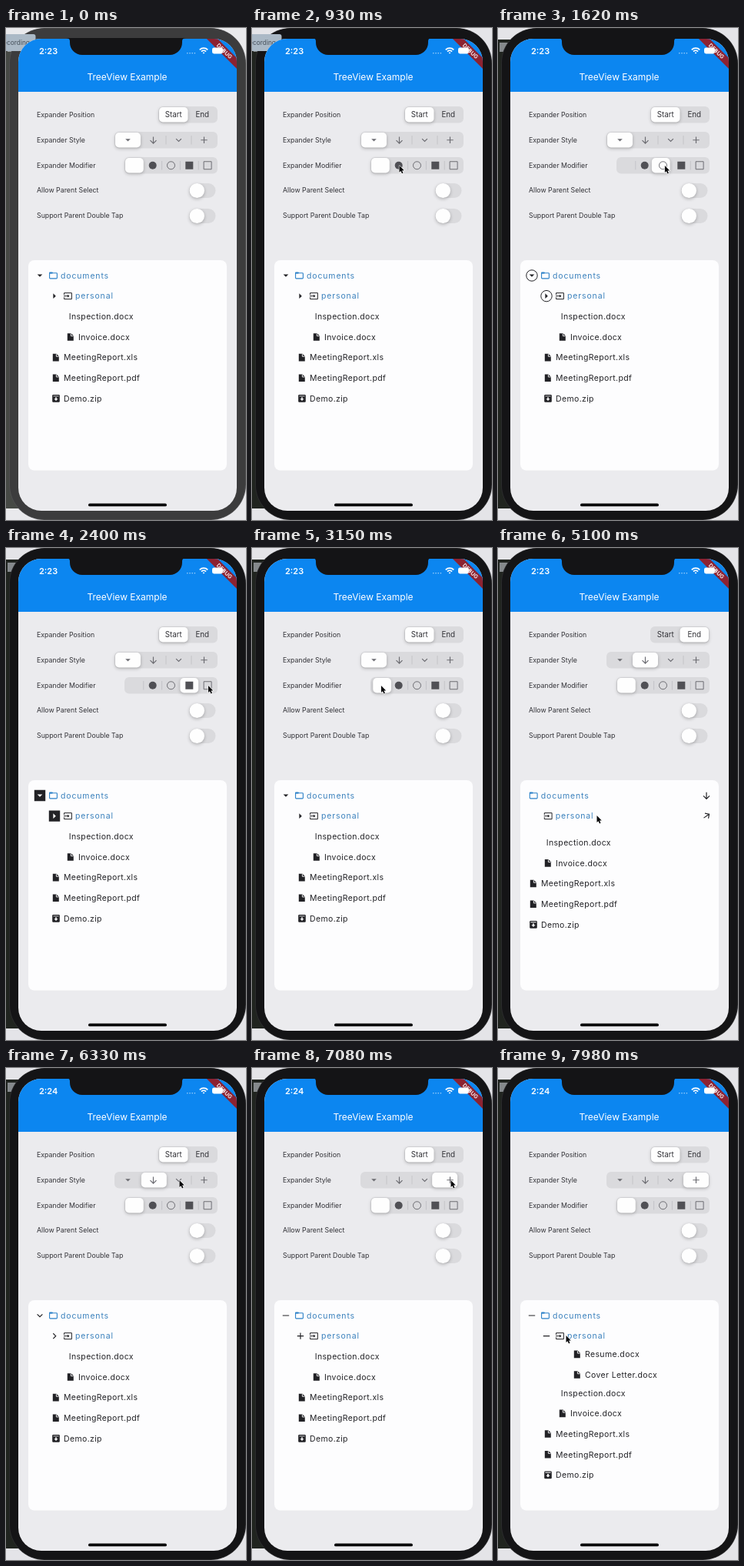
An HTML page with a canvas that plays this animation: 312x640 px, repeating every 8000 ms.

```html
<!DOCTYPE html>
<html lang="en">
<head>
<meta charset="utf-8">
<title>TreeView Example</title>
<style>
html, body { margin: 0; width: 100%; height: 100%; overflow: hidden; background: #ebebee; }
canvas { display: block; width: 312px; height: 640px; }
</style>
</head>
<body>
<canvas id="stage"></canvas>
<script>
const W = 312, H = 640, LOOP = 8000, PI = Math.PI;
const canvas = document.getElementById('stage');
const ctx = canvas.getContext('2d');
const dpr = window.devicePixelRatio || 1;
canvas.width = W * dpr;
canvas.height = H * dpr;

const C = {
  page: '#ebebee', bezel: '#141416', blue: '#0c86f0', card: '#fdfdfe', ink: '#222226',
  label: '#333338', link: '#3c82bd', folder: '#2a80c8', track: '#dadadd', sep: '#c3c3c8',
  glyph: '#6c6c72', ribbon: '#8c2231'
};
const ROW = 26.65, INDENT = 19, FIRST = 322, TRAVEL = 380;

const controls = {
  position: { x: 198, y: 102, w: 77, count: 2 },
  style: { x: 141, y: 135, w: 134, count: 4 },
  modifier: { x: 154, y: 168, w: 121, count: 5 }
};
const cellWidth = c => (c.w - 2) / c.count;
const cellX = (c, i) => c.x + 1 + cellWidth(c) * (i + 0.5);

// Every tap: time, what it sets, new value
const taps = [
  ...[1, 2, 3, 4].map(v => [470 + 493 * v, 'modifier', v]),
  [2900, 'modifier', 0],
  [3680, 'style', 1],
  [4450, 'position', 1],
  [5040, 'open', 1],
  [5480, 'open', 0],
  [5930, 'position', 0],
  [6320, 'style', 2],
  [6950, 'style', 3],
  [7795, 'open', 1]
];

const clamp = v => Math.max(0, Math.min(1, v));
const mix = (a, b, k) => a + (b - a) * k;
const smooth = v => v * v * (3 - 2 * v);
const spring = ms => 1 - (1 + 0.02244 * ms) * Math.exp(-0.02244 * ms);
const linear200 = ms => clamp(ms / 200);

const past = (name, t) => taps.filter(tap => tap[1] === name && tap[0] <= t);
const valueOf = (name, t) => past(name, t).at(-1)?.[2] ?? 0;

function glide(name, t, ease) {
  return past(name, t).reduce((v, [when, , to]) => mix(v, to, ease(t - when)), 0);
}

function box(x, y, w, h, r, fill) {
  ctx.beginPath();
  ctx.roundRect(x, y, w, h, r);
  ctx.fillStyle = fill;
  ctx.fill();
}

function raised(x, y, w, h, r) {
  ctx.save();
  ctx.shadowColor = 'rgba(0,0,0,.25)';
  ctx.shadowBlur = 4 * dpr;
  ctx.shadowOffsetY = 1.5 * dpr;
  box(x, y, w, h, r, '#fefefe');
  ctx.restore();
}

function poly(points, fill) {
  ctx.beginPath();
  points.forEach(([x, y]) => ctx.lineTo(x, y));
  ctx.closePath();
  ctx.fillStyle = fill;
  ctx.fill();
}

function lines(color, width, ...paths) {
  ctx.beginPath();
  for (const p of paths) p.forEach(([x, y], i) => i ? ctx.lineTo(x, y) : ctx.moveTo(x, y));
  ctx.strokeStyle = color;
  ctx.lineWidth = width;
  ctx.stroke();
}

function text(str, x, y, size, color, { weight = 400, align = 'left', spacing = 0 } = {}) {
  ctx.font = `${weight} ${size}px Inter, "Liberation Sans", sans-serif`;
  ctx.letterSpacing = spacing + 'px';
  ctx.textAlign = align;
  ctx.fillStyle = color;
  ctx.fillText(str, x, y);
}

function at(x, y, angle, draw) {
  ctx.save();
  ctx.translate(x, y);
  ctx.rotate(angle);
  draw();
  ctx.restore();
}

// Expander glyphs, pointing down around the origin
const glyphs = [
  c => poly([[-3.3, -1.6], [3.3, -1.6], [0, 1.8]], c),
  c => lines(c, 1.2, [[0, -4.3], [0, 4.2]], [[-4, 0.3], [0, 4.3], [4, 0.3]]),
  c => lines(c, 1.2, [[-3.4, -1.7], [0, 1.7], [3.4, -1.7]]),
  c => lines(c, 1.2, [[-4.2, 0], [4.2, 0]], [[0, -4.2], [0, 4.2]])
];

// 0 none, 1 disc, 2 ring, 3 square, 4 frame
function shape(kind, r, color) {
  if (!kind) return;
  ctx.beginPath();
  if (kind < 3) ctx.arc(0, 0, r, 0, PI * 2);
  else ctx.rect(-r, -r, 2 * r, 2 * r);
  ctx.fillStyle = ctx.strokeStyle = color;
  ctx.lineWidth = 1;
  if (kind % 2) ctx.fill();
  else ctx.stroke();
}

function segments(name, t, drawItem) {
  const c = controls[name], cell = cellWidth(c), pos = glide(name, t, spring);
  box(c.x, c.y, c.w, 21.5, 6, C.track);
  for (let i = 1; i < c.count; i++) {
    ctx.globalAlpha = clamp(Math.abs(i - 0.5 - pos) - 0.5);
    box(cellX(c, i - 0.5) - 0.5, c.y + 5, 1, 11.5, 0, C.sep);
  }
  ctx.globalAlpha = 1;
  raised(cellX(c, pos - 0.5), c.y + 1, cell, 19.5, 5);
  for (let i = 0; i < c.count; i++) at(cellX(c, i), c.y + 10.75, 0, () => drawItem(i));
}

function toggle(y) {
  box(238, y - 9.5, 34.5, 19, 9.5, C.track);
  raised(238.6, y - 9.5, 19.4, 19, 9.5);
}

function backdrop(t) {
  box(0, 0, W, H, 0, '#e4e4e8');
  box(0, 15, 30, 610, 0, '#20241f');
  box(2, 19, 11, 12, 0, '#85898c');
  box(4, 0, 308, 640, 46, '#2c2c2e');
  box(5, 0.6, 306, 638.6, 45, C.bezel);
  // The whole surround starts out brighter
  box(0, 0, W, H, 0, `rgba(255,255,255,${0.17 * (1 - clamp(t / 700))})`);
  ctx.globalAlpha = 1 - clamp((t - 1350) / 250);
  box(-40, 8, 78.5, 22, 3, '#abb9c6');
  text('Stop Recording', 31, 22, 8.4, '#46505a', { align: 'right' });
  ctx.globalAlpha = 1;
}

function statusBar(t) {
  text(t < 5600 ? '2:23' : '2:24', 43, 34, 11, '#fff', { weight: 600 });
  for (let i = 0; i < 4; i++) box(235 + i * 3.2, 32, 1.6, 1.6, 0.8, 'rgba(255,255,255,.65)');
  ctx.strokeStyle = '#fff';
  ctx.lineWidth = 1.8;
  for (let r = 1; r < 8; r += 3.2) {
    ctx.beginPath();
    ctx.arc(257, 33.5, r, -PI * 0.75, -PI * 0.25);
    ctx.stroke();
  }
  box(268, 25.5, 14, 8, 2.4, '#fff');
  box(282.8, 28, 1.2, 3, 0.6, '#fff');
}

function appBar(t) {
  box(16, 14, 284, 69, 0, C.blue);
  text('TreeView Example', 157.5, 68, 12, '#fff', { align: 'center' });
  at(284, 30, PI / 4, () => {
    box(-50, -5, 100, 10, 0, C.ribbon);
    text('DEBUG', 0, 2.6, 7.2, '#f1e2e4', { weight: 700, align: 'center' });
  });
  statusBar(t);
}

function notch() {
  const l = 83, r = 229, top = 14, bottom = 35;
  ctx.beginPath();
  ctx.moveTo(l - 5, top - 1);
  ctx.arcTo(l, top, l, top + 6, 4);
  ctx.arcTo(l, bottom, l + 20, bottom, 16);
  ctx.arcTo(r, bottom, r, top, 16);
  ctx.arcTo(r, top, r + 5, top - 1, 4);
  ctx.lineTo(r + 5, top - 1);
  ctx.fillStyle = C.bezel;
  ctx.fill();
}

function settings(t) {
  ['Expander Position', 'Expander Style', 'Expander Modifier', 'Allow Parent Select',
    'Support Parent Double Tap'].forEach((s, i) => text(s, 40, 116 + i * 32.8, 8.8, C.label));
  segments('position', t, i =>
    text(i ? 'End' : 'Start', 0, 3.6, 9.8, C.label, { align: 'center' }));
  segments('style', t, i => glyphs[i](C.glyph));
  segments('modifier', t, i => shape(i, 5, i % 2 ? '#505055' : C.glyph));
  toggle(211.5);
  toggle(244.5);
}

const icons = {
  folder() {
    ctx.beginPath();
    ctx.roundRect(0.6, -3.3, 9.8, 7.2, 0.8);
    ctx.strokeStyle = C.folder;
    ctx.lineWidth = 1.1;
    ctx.stroke();
    box(0.1, -4.6, 4.8, 2, 0.8, C.folder);
  },
  input() {
    lines(C.ink, 1, [[0.6, -1.6], [0.6, -4], [10.4, -4], [10.4, 4], [0.6, 4], [0.6, 1.6]],
      [[0, 0], [6.2, 0]]);
    poly([[5, -2.2], [7.4, 0], [5, 2.2]], C.ink);
  },
  file() {
    poly([[0.8, -4.8], [5.6, -4.8], [8.8, -1.6], [8.8, 4.8], [0.8, 4.8]], C.ink);
    lines(C.card, 0.9, [[5.4, -4.4], [5.4, -1.3], [8.6, -1.3]]);
  },
  zip() {
    box(0.2, -4.8, 9.6, 9.6, 1.2, C.ink);
    box(1.4, -3.5, 7.2, 0.9, 0, C.card);
    box(4.1, -1.4, 1.8, 2, 0, C.card);
    poly([[2.4, 0.4], [7.6, 0.4], [5, 3.1]], C.card);
  }
};

function expander(x, y, turn, open, s) {
  const plus = s.style === 3;
  const angle = plus ? 0 : (turn - 1) * (s.end ? PI : PI / 2);
  const color = s.modifier % 2 ? '#fff' : C.ink;
  at(x, y, 0, () => shape(s.modifier, 7.2, C.ink));
  at(x, y, angle, () => {
    if (plus && open) lines(color, 1.2, [[-4.2, 0], [4.2, 0]]);
    else glyphs[s.style](color);
  });
}

function parent(name, icon, depth, turn, open, s) {
  const y = FIRST + ROW * depth, x = INDENT * depth - (s.end ? 15.3 : 0);
  expander(s.end ? 271 : 44 + INDENT * depth, y, turn, open, s);
  at(56 + x, y, 0, icons[icon]);
  text(name, 71 + x, y + 3.8, 10.5, C.link, { spacing: 0.85 });
}

function leaf(name, icon, depth, y, s) {
  const x = INDENT * (depth - (s.end ? 1 : 0));
  if (icon) at(60 + x, y, 0, icons[icon]);
  text(name, (icon ? 75 : 62.7) + x, y + 3.8, 10.5, C.ink, { spacing: 0.36 });
}

function tree(t) {
  const turn = glide('open', t, linear200);
  const s = {
    end: valueOf('position', t),
    style: valueOf('style', t),
    modifier: valueOf('modifier', t)
  };
  const full = 2 * ROW, height = full * turn ** 1.6, top = FIRST + ROW * 1.5;
  box(29, 302, 258, 273.5, 8, C.card);
  parent('documents', 'folder', 0, 1, true, s);
  parent('personal', 'input', 1, turn, valueOf('open', t), s);

  // Children are revealed from the middle outwards
  ctx.save();
  ctx.beginPath();
  ctx.rect(29, top, 258, height);
  ctx.clip();
  ['Resume.docx', 'Cover Letter.docx'].forEach((name, i) =>
    leaf(name, 'file', 2, top + ROW * (i + 0.5) - (full - height) / 2, s));
  ctx.restore();

  [['Inspection.docx', '', 1], ['Invoice.docx', 'file', 1], ['MeetingReport.xls', 'file', 0],
    ['MeetingReport.pdf', 'file', 0], ['Demo.zip', 'zip', 0]].forEach(([name, icon, depth], i) =>
    leaf(name, icon, depth, FIRST + ROW * (i + 2) + height, s));
}

function tapSpot([when, name, value]) {
  if (name === 'open') return [valueOf('position', when) ? 128.5 : 88.5, 348];
  const c = controls[name];
  return [cellX(c, value) + 1, c.y + 11];
}

// The pointer rests where it tapped, then travels to reach the next tap just in time
function cursor(t) {
  const [x, y] = taps.reduce(([px, py], tap) => {
    const k = smooth(clamp((t - tap[0] + TRAVEL) / (TRAVEL - 25)));
    const [tx, ty] = tapSpot(tap);
    return [mix(px, tx, k), mix(py, ty, k)];
  }, [-14, 60]);
  at(x, y, 0, () => {
    const arrow = [[0, 0], [0, 9], [2, 7.2], [3.5, 10.5], [5, 9.8], [3.6, 6.6], [6.3, 6.4]];
    lines('#fff', 1.2, [...arrow, arrow[0]]);
    poly(arrow, '#08080a');
  });
}

function draw(t) {
  ctx.setTransform(dpr, 0, 0, dpr, 0, 0);
  backdrop(t);
  ctx.save();
  ctx.beginPath();
  ctx.roundRect(16, 14, 284, 614, 30);
  ctx.clip();
  box(16, 14, 284, 614, 0, C.page);
  appBar(t);
  settings(t);
  tree(t);
  box(107, 618.5, 102, 3.8, 1.9, '#0a0a0b');
  ctx.restore();
  notch();
  cursor(t);
}

const start = performance.now();
function frame() {
  draw((performance.now() - start) % LOOP);
  requestAnimationFrame(frame);
}
frame();
</script>
</body>
</html>
```
